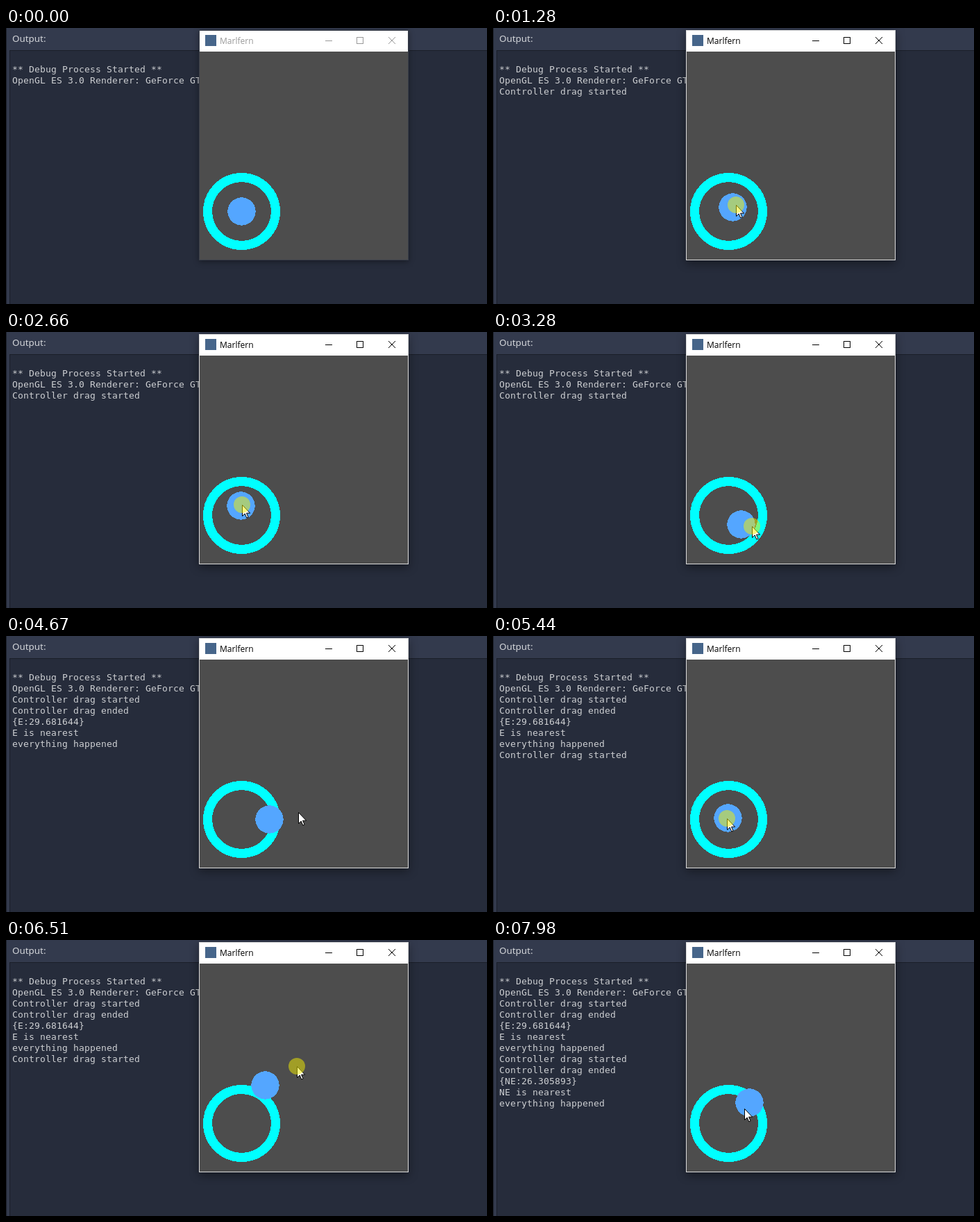
These frames come from a looping animation (693 px wide and 398 px high, 8 s). An HTML page:

```html
<!DOCTYPE html>
<html lang="en">
<head>
<meta charset="utf-8">
<title>Drag controller</title>
<style>
  html, body { margin: 0; width: 100%; height: 100%; overflow: hidden; background: #262c3b; }
  svg { display: block; width: 693px; height: 398px; }
  .log { font: 13px "DejaVu Sans Mono", "Noto Sans Mono", monospace; letter-spacing: .174px; fill: #cdcfd2; white-space: pre; }
  .label { font: 13.4px "Noto Sans", "Open Sans", sans-serif; fill: #d3d5d9; }
  .title { font: 12px "Open Sans", "Noto Sans", sans-serif; }
  .crisp { shape-rendering: crispEdges; }
  #frame { fill: #fff; stroke: #3b404b; filter: drop-shadow(0 2px 4px rgba(0,0,0,.4)); }
  #chrome { color: #999; }
  .active #frame { stroke: #dcdcdc; filter: drop-shadow(0 4px 7px rgba(0,0,0,.42)); }
  .active #chrome { color: #000; }
</style>
</head>
<body>
<svg id="stage" viewBox="0 0 693 398" xmlns="http://www.w3.org/2000/svg">
  <rect width="693" height="398" fill="#333a4d"/>
  <rect width="1" height="398" fill="#1d212c"/>
  <rect x="5.5" y="32.5" width="700" height="400" fill="#262c3b" stroke="#1a1e28"/>
  <text class="label" x="9" y="20">Output:</text>
  <g id="log"></g>

  <rect id="frame" x="278.5" y="3.5" width="301" height="331"/>
  <rect x="279" y="34" width="300" height="300" fill="#4d4d4d"/>
  <rect x="287" y="10" width="16" height="16" fill="#46658a"/>
  <g id="chrome" fill="none" stroke="currentColor">
    <text class="title" x="308" y="23" fill="currentColor" stroke="none">Marlfern</text>
    <path class="crisp" d="M460 18.5h10M505.5 13.5h9v9h-9z"/>
    <path d="M551 13l10 10M561 13l-10 10"/>
  </g>

  <circle class="crisp" cx="339.5" cy="264.5" r="48.95" fill="none" stroke="#0ff" stroke-width="13.1"/>
  <circle id="knob" class="crisp" r="20.2" fill="#54a6ff"/>
  <g id="pointer">
    <path d="M.5.5v16l3.7-3.5 2.6 6 2.3-1-2.6-5.8h5.1z" fill="#fff" stroke="#000"/>
    <circle id="press" r="12" fill="#f5f000" fill-opacity=".5"/>
  </g>
</svg>
<script>
const LOOP = 8000, START = 200, STEP = 1000 / 13, ENTER = 3;
const HOME = { x: 339.5, y: 264.5 }, REACH = 69, FOLLOW = 0.6;
const $ = id => document.getElementById(id);

// Each drag lasts from grab to drop, then the knob snaps to its rest place.
const drags = [
  { grab: 14, drop: 46, fade: 48, rest: { x: 379.5, y: 264.5 }, name: "E", distance: "29.681644" },
  { grab: 65, drop: 83, fade: 86, rest: { x: 369.5, y: 234.5 }, name: "NE", distance: "26.305893" }
];

// Turning points of the pointer: [step, x, y].
const path = [
  [3, 400, 392], [11, 350, 255], [14, 350, 255], [18, 358, 258], [23, 319, 264],
  [25, 325, 268], [31, 340, 249], [35, 354, 256], [39, 332, 276], [40, 373, 280],
  [46, 477, 277], [53, 477, 277], [58, 421, 254], [66, 340, 262], [68, 337, 263],
  [72, 388, 271], [76, 340, 264], [80.5, 346, 186], [82, 419, 182], [83, 424, 181],
  [94, 424, 181], [101, 362, 243]
];

const lines = [];
function log(step, ...texts) {
  for (const str of texts) {
    const el = document.createElementNS("http://www.w3.org/2000/svg", "text");
    el.setAttribute("class", "log");
    el.setAttribute("x", 9);
    el.setAttribute("y", 64 + 16 * lines.length);
    el.textContent = str;
    $("log").append(el);
    lines.push({ step, el });
  }
}
log(-Infinity, "** Debug Process Started **", "OpenGL ES 3.0 Renderer: GeForce GT");
for (const { grab, drop, name, distance } of drags) {
  log(grab, "Controller drag started");
  log(drop, "Controller drag ended", `{${name}:${distance}}`, `${name} is nearest`, "everything happened");
}

// Smooth curve through the turning points that never overshoots them.
function pointerAt(k) {
  const last = path.length - 1;
  const t = Math.min(Math.max(k, path[0][0]), path[last][0]);
  const i = Math.max(path.findIndex(p => p[0] >= t) - 1, 0);
  const slope = (j, c) => j < 0 || j >= last ? 0
    : (path[j + 1][c] - path[j][c]) / (path[j + 1][0] - path[j][0]);
  const tangent = (j, c) => {
    const a = slope(j - 1, c), b = slope(j, c);
    return a * b <= 0 ? 0 : 2 * a * b / (a + b);
  };
  const span = path[i + 1][0] - path[i][0], u = (t - path[i][0]) / span;
  const ease = u * u * (3 - 2 * u);
  const at = c => path[i][c] + (path[i + 1][c] - path[i][c]) * ease
    + span * u * (1 - u) * ((1 - u) * tangent(i, c) - u * tangent(i + 1, c));
  return { x: at(1), y: at(2) };
}

function withinReach({ x, y }) {
  const dx = x - HOME.x, dy = y - HOME.y;
  const scale = Math.min(1, REACH / Math.hypot(dx, dy));
  return { x: HOME.x + dx * scale, y: HOME.y + dy * scale };
}

// While held, the knob closes part of the gap to the pointer at every step.
function knobAt(k) {
  let knob = HOME;
  for (const { grab, drop, rest } of drags) {
    if (k >= drop) {
      knob = rest;
      continue;
    }
    for (let s = grab; s <= k; s++) {
      const goal = withinReach(pointerAt(s));
      knob = { x: knob.x + (goal.x - knob.x) * FOLLOW, y: knob.y + (goal.y - knob.y) * FOLLOW };
    }
  }
  return knob;
}

function place(el, { x, y }, snap) {
  el.setAttribute("transform", `translate(${snap(x)} ${snap(y)})`);
}

function show(el, on) {
  el.setAttribute("visibility", on ? "visible" : "hidden");
}

function draw(t) {
  const k = Math.floor((t - START) / STEP);
  $("stage").classList.toggle("active", k >= 0);
  lines.forEach(({ step, el }) => show(el, k >= step));
  place($("knob"), knobAt(k), v => Math.floor(v) + 0.5);
  place($("pointer"), pointerAt(k), Math.round);
  show($("pointer"), k >= ENTER);
  show($("press"), drags.some(d => k >= d.grab && k < d.fade));
}

const began = performance.now();
function tick() {
  draw((performance.now() - began) % LOOP);
  requestAnimationFrame(tick);
}
tick();
</script>
</body>
</html>
```
